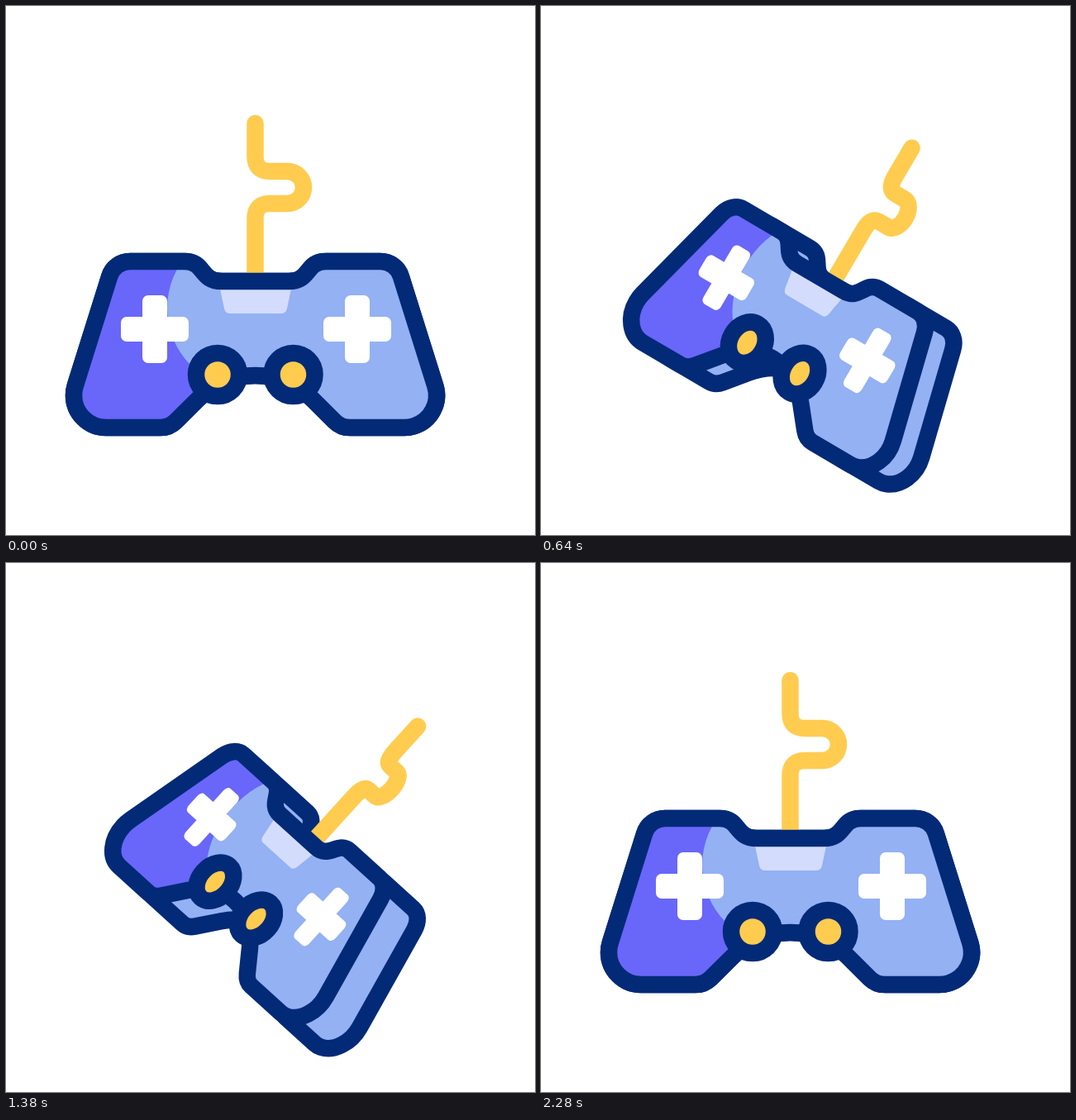
Animation of 640 by 640 pixels, one loop 2400 ms. Source, as an HTML page with a canvas:

```html
<!DOCTYPE html>
<html lang="en">
<head>
<meta charset="utf-8">
<title>Game controller</title>
<style>
  html, body { margin: 0; width: 100%; height: 100%; overflow: hidden; background: #fff; }
  canvas { display: block; width: 640px; height: 640px; }
</style>
</head>
<body>
<canvas id="stage" width="640" height="640"></canvas>
<script>
const ctx = document.getElementById('stage').getContext('2d');
const LOOP = 2400, LINE = 20.5, CX = 301.5, PIVOT_Y = 299.5, MAX_TILT = 43.6;
const NAVY = '#032a77', YELLOW = '#ffcc50', PURPLE = '#6966fa',
      BLUE = '#93b1f3', PALE = '#d3dcfd', WHITE = '#fff';

const clamp = v => Math.min(1, Math.max(0, v));
const smooth = t => t * t * (3 - 2 * t);

// Symmetric cubic-bezier(a, 0, 1 - a, 1), solved by bisection.
function ease(x, a = 0.7775) {
  let lo = 0, hi = 1;
  for (let i = 0; i < 30; i++) {
    const t = (lo + hi) / 2, u = 1 - t;
    if (3 * t * u * u * a + 3 * t * t * u * (1 - a) + t ** 3 < x) lo = t; else hi = t;
  }
  return smooth(lo);
}

function makeBody() {
  const p = new Path2D(), m = x => 2 * CX - x, side = 3.446;
  p.moveTo(CX, 447);
  p.bezierCurveTo(275, 447, 250, 458, 232, 476);
  p.arc(187, 484, 26, Math.PI / 4, Math.PI / 2);
  p.arc(121, 471, 39, Math.PI / 2, side);
  p.arc(150, 335, 26, side, Math.PI * 1.5);
  p.lineTo(216, 309);
  p.bezierCurveTo(241, 309, 234, 333, 261, 333);
  p.lineTo(m(261), 333);
  p.bezierCurveTo(m(234), 333, m(241), 309, m(216), 309);
  p.arc(m(150), 335, 26, -Math.PI / 2, Math.PI - side);
  p.arc(m(121), 471, 39, Math.PI - side, Math.PI / 2);
  p.arc(m(187), 484, 26, Math.PI / 2, Math.PI * 0.75);
  p.lineTo(m(232), 476);
  p.bezierCurveTo(m(250), 458, m(275), 447, CX, 447);
  p.closePath();
  return p;
}

function makeCross(x, y) {
  const p = new Path2D(), arm = 41, half = 15;
  p.roundRect(x - arm, y - half, arm * 2, half * 2, 7);
  p.roundRect(x - half, y - arm, half * 2, arm * 2, 7);
  return p;
}

function makeCircle(x, y, r) {
  const p = new Path2D();
  p.arc(x, y, r, 0, Math.PI * 2);
  return p;
}

const body = makeBody();
const glow = makeCircle(293, 365.5, 98);
glow.rect(293, 290, 260, 240);
const crosses = [makeCross(180, 391), makeCross(425, 391)];
const knobs = [makeCircle(256, 446, 26), makeCircle(347.5, 446, 26)];
const panel = new Path2D('M256 328H348L340 366Q338.500 372 333 372H271Q265.500 372 264 366Z');
const cable = new Path2D('M301.500 142V182Q301.500 200 319.500 200H340.500' +
  'A19.500 19.500 0 0 1 340.500 239H319.500Q301.500 239 301.500 257V333');

// Squeezes a path horizontally so that its outline keeps an even width.
function squeeze(path, scale, shift = 0) {
  const p = new Path2D();
  p.addPath(path, new DOMMatrix([scale, 0, 0, 1, CX * (1 - scale) + shift, 0]));
  return p;
}

function fill(path, color) {
  ctx.fillStyle = color;
  ctx.fill(path);
}

function stroke(path, color) {
  ctx.strokeStyle = color;
  ctx.lineWidth = LINE;
  ctx.stroke(path);
}

function drawController(tilt) {
  const scale = 1 - 0.00634 * tilt;
  const front = path => squeeze(path, scale);
  ctx.save();
  ctx.translate(CX + 1.765 * tilt, PIVOT_Y);
  ctx.rotate(tilt * Math.PI / 180);
  ctx.translate(-CX, -PIVOT_Y);

  const back = squeeze(body, scale, 1.31 * tilt);
  fill(back, BLUE);
  stroke(back, NAVY);
  stroke(squeeze(cable, 1 - 0.0125 * tilt, 0.52 * tilt), YELLOW);

  const face = front(body);
  ctx.save();
  ctx.clip(face);
  fill(face, PURPLE);
  fill(front(glow), BLUE);
  fill(front(panel), PALE);
  ctx.restore();
  stroke(face, NAVY);
  crosses.forEach(c => fill(front(c), WHITE));
  knobs.map(front).forEach(k => {
    fill(k, YELLOW);
    stroke(k, NAVY);
  });
  ctx.restore();
}

function drawSparks(ms) {
  if (ms < 720 || ms >= 1080) return;
  const inner = 115, reach = 45;
  const head = inner + reach * smooth(clamp((ms - 720) / 200));
  const tail = inner + reach * smooth(clamp((ms - 860) / 200));
  for (const deg of [218.5, 252.2, 282.6]) {
    const a = deg * Math.PI / 180, dx = Math.cos(a), dy = Math.sin(a);
    const p = new Path2D();
    p.moveTo(237 + dx * tail, 262 + dy * tail);
    p.lineTo(237 + dx * head + 0.01, 262 + dy * head);
    stroke(p, YELLOW);
  }
}

function draw(now) {
  const ms = Math.floor((now % LOOP) / 20) * 20;
  const swing = ms < 1160 ? ease(ms / 1160) : 1 - ease(clamp((ms - 1162) / 1055));
  ctx.fillStyle = WHITE;
  ctx.fillRect(0, 0, 640, 640);
  ctx.lineCap = ctx.lineJoin = 'round';
  drawSparks(ms);
  drawController(MAX_TILT * swing);
}

let start;
function tick(now) {
  start ??= now;
  draw(Math.max(0, now - start));
  requestAnimationFrame(tick);
}
draw(0);
requestAnimationFrame(tick);
</script>
</body>
</html>
```
